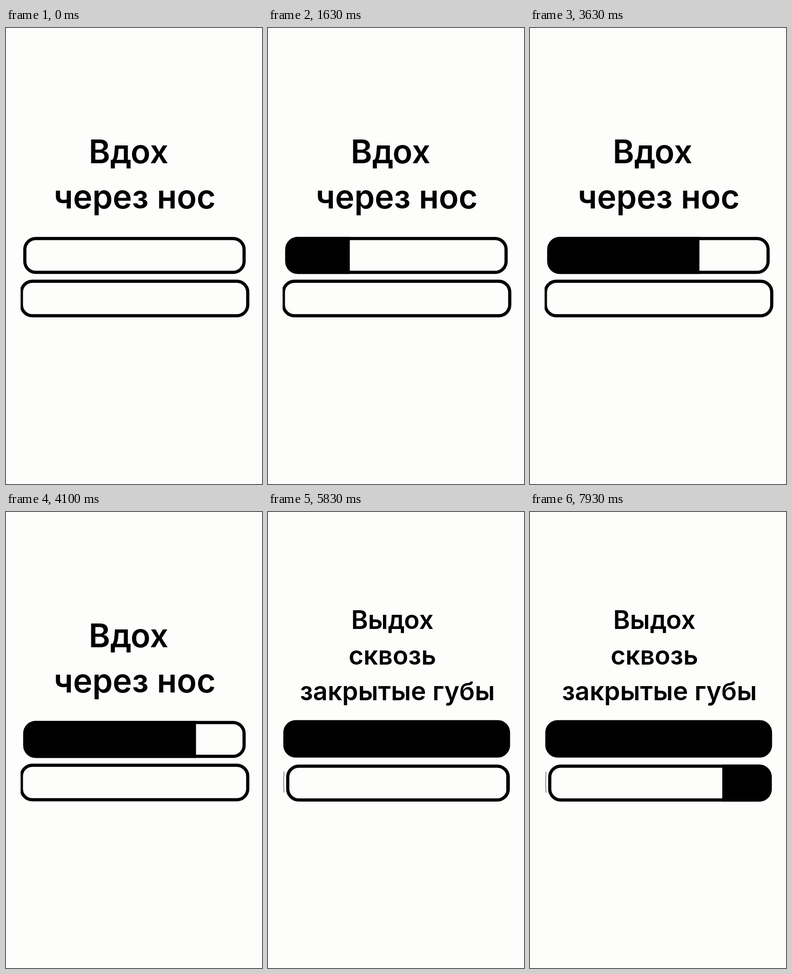
These frames come from a looping animation (561 px wide and 998 px high, 8000 ms). An HTML page:

```html
<!DOCTYPE html>
<html lang="ru">
<head>
<meta charset="utf-8">
<title>Дыхание</title>
<style>
  html, body { margin: 0; width: 100%; height: 100%; overflow: hidden; background: #fdfdfc; }
  svg { display: block; width: 100%; height: 100%; }

  text {
    font-family: Inter, "Open Sans", sans-serif;
    font-weight: 600;
    text-anchor: middle;
  }
  .inhale text { font-size: 71.5px; }
  .exhale text { font-size: 56px; }

  .outline { fill: none; stroke: #000; stroke-width: 7; }

  .inhale { animation: show-first 8s step-end infinite; }
  .exhale { animation: show-second 8s step-end infinite; }
  .inhale .fill { animation: grow 8s linear infinite; }
  .exhale .fill { animation: shrink 8s linear infinite; }

  @keyframes show-first { 0% { visibility: visible; } 63.7%, 100% { visibility: hidden; } }
  @keyframes show-second { 0% { visibility: hidden; } 63.7%, 100% { visibility: visible; } }

  /* The fill edge enters the bar a little after its scene begins. */
  @keyframes grow { from { transform: translateX(22.7px); } to { transform: translateX(790.7px); } }
  @keyframes shrink { from { transform: translateX(802px); } to { transform: translateX(418px); } }
</style>
</head>
<body>
<svg viewBox="0 0 561 998">
  <defs>
    <clipPath id="inhale-bar"><rect x="37.75" y="457.25" width="487.5" height="81" rx="27"/></clipPath>
    <clipPath id="exhale-bar"><rect x="39.75" y="552.75" width="490" height="81" rx="27"/></clipPath>
    <clipPath id="left-crop"><rect x="32" y="540" width="520" height="110"/></clipPath>
  </defs>

  <g class="inhale">
    <text x="268.5" y="296">Вдох</text>
    <text x="282" y="395">через нос</text>
    <g clip-path="url(#inhale-bar)">
      <rect class="fill" x="-800" y="450" width="800" height="95"/>
    </g>
    <rect class="outline" x="41.25" y="460.75" width="480.5" height="74" rx="24"/>
    <g clip-path="url(#left-crop)">
      <rect class="outline" x="33.75" y="554.25" width="496" height="75.5" rx="24"/>
    </g>
  </g>

  <g class="exhale">
    <text x="272.5" y="256">Выдох</text>
    <text x="272.5" y="334">сквозь</text>
    <text x="283.5" y="411.5">закрытые губы</text>
    <rect x="33.5" y="455.5" width="497" height="82" rx="27"/>
    <g clip-path="url(#exhale-bar)">
      <rect class="fill" x="0" y="545" width="600" height="95"/>
    </g>
    <rect class="outline" x="43.25" y="556.25" width="483" height="74" rx="24"/>
    <path d="M35 568Q33.6 591 35 614" fill="none" stroke="#333"/>
  </g>
</svg>
</body>
</html>
```
